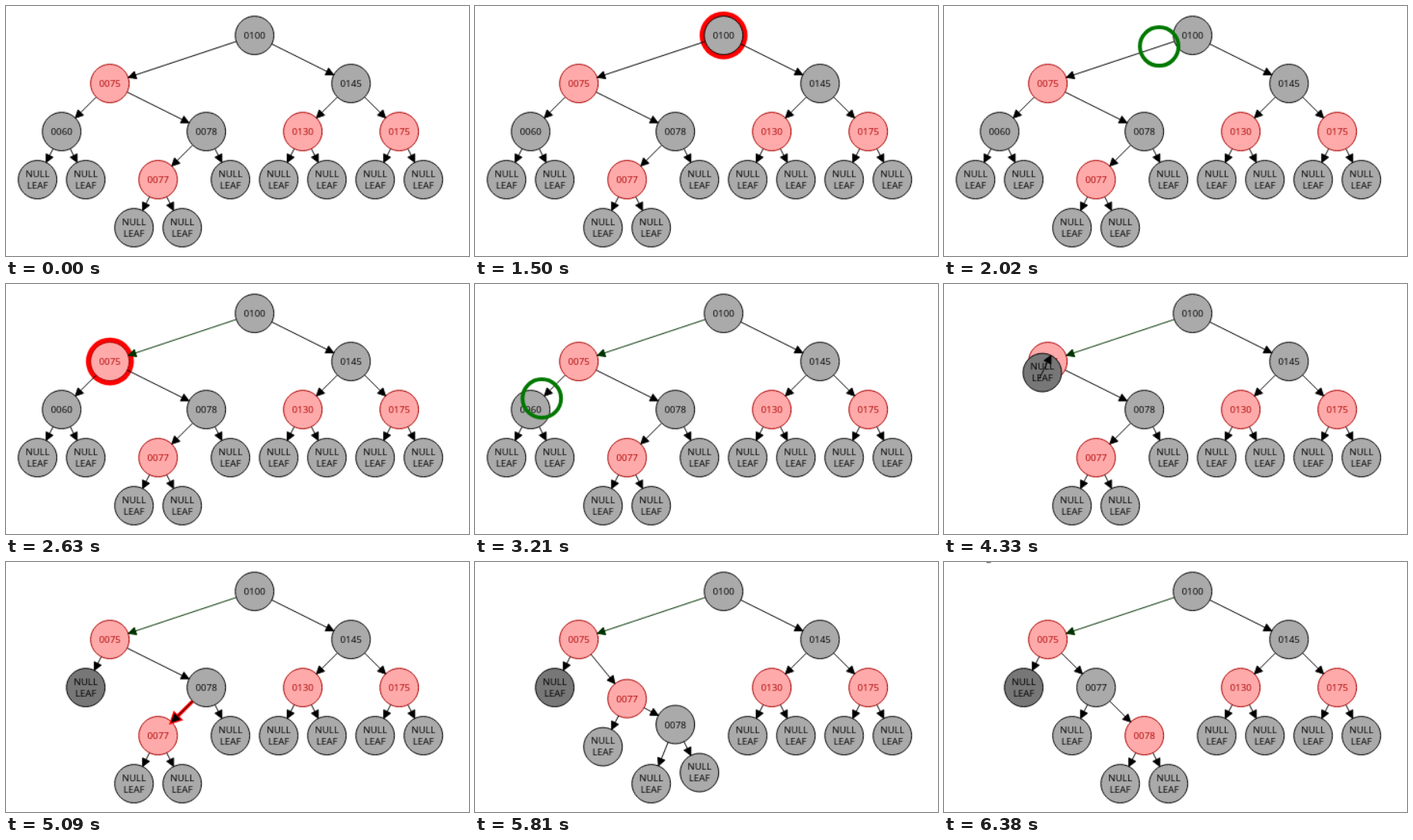
Write an HTML page with a canvas that moves like this. It is 600 px wide and 325 px high and loops after 6800 ms.

```html
<!DOCTYPE html>
<html lang="en">
<head>
<meta charset="utf-8">
<title>Red-black tree deletion</title>
<style>
  html, body { margin: 0; width: 100%; height: 100%; overflow: hidden; background: #fff; }
  canvas { display: block; width: 600px; height: 325px; }
</style>
</head>
<body>
<!-- Drawn at 100% and shown at 125%, which softens lines and text -->
<canvas id="stage" width="480" height="260"></canvas>
<script>
const LOOP = 6800, RADIUS = 25, STEPS = 13, ZOOM = 1.25;
const ctx = document.getElementById('stage').getContext('2d');

// [time in ms, tick]; every action takes 13 ticks
const CLOCK = [
  [0, -13], [1500, 0], [1900, 13], [2020, 16], [2180, 18], [2230, 19],
  [2470, 26], [2890, 39], [2920, 40], [3210, 49], [3310, 52], [3800, 65],
  [4220, 78], [4330, 81], [4665, 91], [5090, 104], [5490, 117],
  [5810, 127], [5940, 130], [6380, 143], [6800, 155]
];
const AT = {
  markRoot: 0, moveLeft: 13, markLeft: 26, moveDown: 39, markFound: 52,
  removed: 65, newLeaf: 78, markEdge: 104, rotate: 117, recolor: 130, message: 143
};
const PALETTE = {
  black: ['#000', '#aaa'],
  red: ['#a00', '#faa'],
  double: ['#000', '#777']
};

const grid = (col, row) => ({ x: 9.6 + 31.25 * col, y: 38.2 + 62.5 * row });
const mix = (a, b, p) => ({ x: a.x + (b.x - a.x) * p, y: a.y + (b.y - a.y) * p });
const progress = (tick, start) => Math.max(0, Math.min(1, (tick - start) / STEPS));
const during = (tick, start) => tick >= start && tick < start + STEPS;

function tickAt(time) {
  const i = CLOCK.findIndex(key => key[0] > time);
  const [t0, k0] = CLOCK[i - 1], [t1, k1] = CLOCK[i];
  return Math.floor(k0 + (k1 - k0) * (time - t0) / (t1 - t0) + 1e-6);
}

// Triangle wave used by every highlight
function pulse(tick) {
  const phase = (((tick - 15) % 56) + 56) % 56;
  return ZOOM * (3 + Math.abs(phase - 28) / 7);
}

function buildTree(tick) {
  const nodes = {}, edges = [];
  const add = (id, at, color = 'black', label = id) => { nodes[id] = { ...at, color, label }; };
  const leaf = (id, at, color) => add(id, at, color, 'NULL LEAF');
  const link = (from, ...ids) => ids.forEach(to => edges.push([from, to]));

  const turn = progress(tick, AT.rotate);
  const rotated = tick >= AT.rotate, recolored = tick >= AT.recolor;

  add('0100', grid(10, 0));
  add('0075', grid(4, 1), 'red');
  add('0145', grid(14, 1));
  add('0130', grid(12, 2), 'red');
  add('0175', grid(16, 2), 'red');
  [11, 13, 15, 17].forEach(col => leaf('r' + col, grid(col, 3)));
  link('0100', '0075', '0145');
  link('0145', '0130', '0175');
  link('0130', 'r11', 'r13');
  link('0175', 'r15', 'r17');

  if (tick < AT.removed) {
    add('0060', grid(2, 2));
    leaf('a', grid(1, 3));
    leaf('b', grid(3, 3));
    link('0075', '0060');
    link('0060', 'a', 'b');
  } else if (tick >= AT.newLeaf) {
    leaf('new', mix(grid(4, 1), grid(3, 2), progress(tick, AT.newLeaf)), 'double');
    link('0075', 'new');
  }

  add('0077', grid(6, 3 - turn), recolored ? 'black' : 'red');
  add('0078', grid(8, 2 + turn), recolored ? 'red' : 'black');
  leaf('c', grid(5, 4 - turn));
  leaf('d', grid(7, 4));
  leaf('e', grid(9, 3 + turn));
  link('0075', rotated ? '0077' : '0078');
  link('0077', 'c', rotated ? '0078' : 'd');
  link('0078', rotated ? 'd' : '0077', 'e');
  return { nodes, edges };
}

function circle(at, radius) {
  ctx.beginPath();
  ctx.arc(at.x, at.y, radius, 0, 2 * Math.PI);
}

function drawNode(node, glow) {
  const [ink, fill] = PALETTE[node.color];
  if (glow) {
    circle(node, RADIUS + glow);
    ctx.fillStyle = '#f00';
    ctx.fill();
  }
  circle(node, RADIUS);
  ctx.fillStyle = fill;
  ctx.fill();
  ctx.lineWidth = ZOOM;
  ctx.strokeStyle = ink;
  ctx.stroke();
  ctx.fillStyle = ink;
  ctx.textAlign = 'center';
  const lines = node.label.split(' ');
  lines.forEach((line, i) => {
    const offset = lines.length > 1 ? 15 * i - 7.7 : 0;
    ctx.fillText(line, node.x, node.y + offset + 4.4);
  });
}

function drawArrow(from, to, width, color) {
  const length = Math.hypot(to.x - from.x, to.y - from.y);
  if (!length) return;
  const ux = (to.x - from.x) / length, uy = (to.y - from.y) / length;
  const start = { x: from.x + ux * RADIUS, y: from.y + uy * RADIUS };
  const tip = { x: to.x - ux * RADIUS, y: to.y - uy * RADIUS };
  // The arrow flips while its two nodes overlap
  const dir = length < 2 * RADIUS ? -1 : 1;
  const base = { x: tip.x - dir * ux * 10, y: tip.y - dir * uy * 10 };
  ctx.lineWidth = width;
  ctx.strokeStyle = ctx.fillStyle = color;
  ctx.beginPath();
  ctx.moveTo(start.x, start.y);
  ctx.lineTo(tip.x, tip.y);
  ctx.stroke();
  ctx.beginPath();
  ctx.moveTo(tip.x, tip.y);
  ctx.lineTo(base.x - uy * 5, base.y + ux * 5);
  ctx.lineTo(base.x + uy * 5, base.y - ux * 5);
  ctx.closePath();
  ctx.fill();
  ctx.stroke();
}

function drawCursor(at) {
  circle(at, RADIUS);
  ctx.lineWidth = 5;
  ctx.strokeStyle = '#007800';
  ctx.stroke();
}

function draw(time) {
  const tick = tickAt(time);
  const { nodes, edges } = buildTree(tick);
  const marked = during(tick, AT.markRoot) ? '0100'
    : during(tick, AT.markLeft) ? '0075'
    : during(tick, AT.markFound) ? '0060' : '';

  ctx.setTransform(1 / ZOOM, 0, 0, 1 / ZOOM, 0, 0);
  ctx.fillStyle = '#fff';
  ctx.fillRect(0, 0, 600, 325);
  ctx.font = '12.25px "Open Sans", "Noto Sans", sans-serif';

  for (const id in nodes) drawNode(nodes[id], id === marked ? pulse(tick) : 0);
  for (const [from, to] of edges) {
    const a = nodes[from], b = nodes[to];
    if (from === '0078' && to === '0077' && during(tick, AT.markEdge)) {
      drawArrow(a, b, pulse(tick), '#f00');
    }
    const visited = to === '0075' && tick >= AT.markLeft;
    drawArrow(a, b, ZOOM, visited ? '#003200' : '#000');
  }

  if (during(tick, AT.moveLeft)) {
    drawCursor(mix(nodes['0100'], nodes['0075'], progress(tick, AT.moveLeft)));
  }
  if (during(tick, AT.moveDown)) {
    drawCursor(mix(nodes['0075'], nodes['0060'], progress(tick, AT.moveDown)));
  }
  if (tick >= AT.message) {
    ctx.fillStyle = '#000';
    ctx.textAlign = 'left';
    ctx.fillText('Deleting node,', 14, -1.5);
  }
}

const origin = performance.now();
function loop() {
  draw((performance.now() - origin) % LOOP);
  requestAnimationFrame(loop);
}
loop();
</script>
</body>
</html>
```
